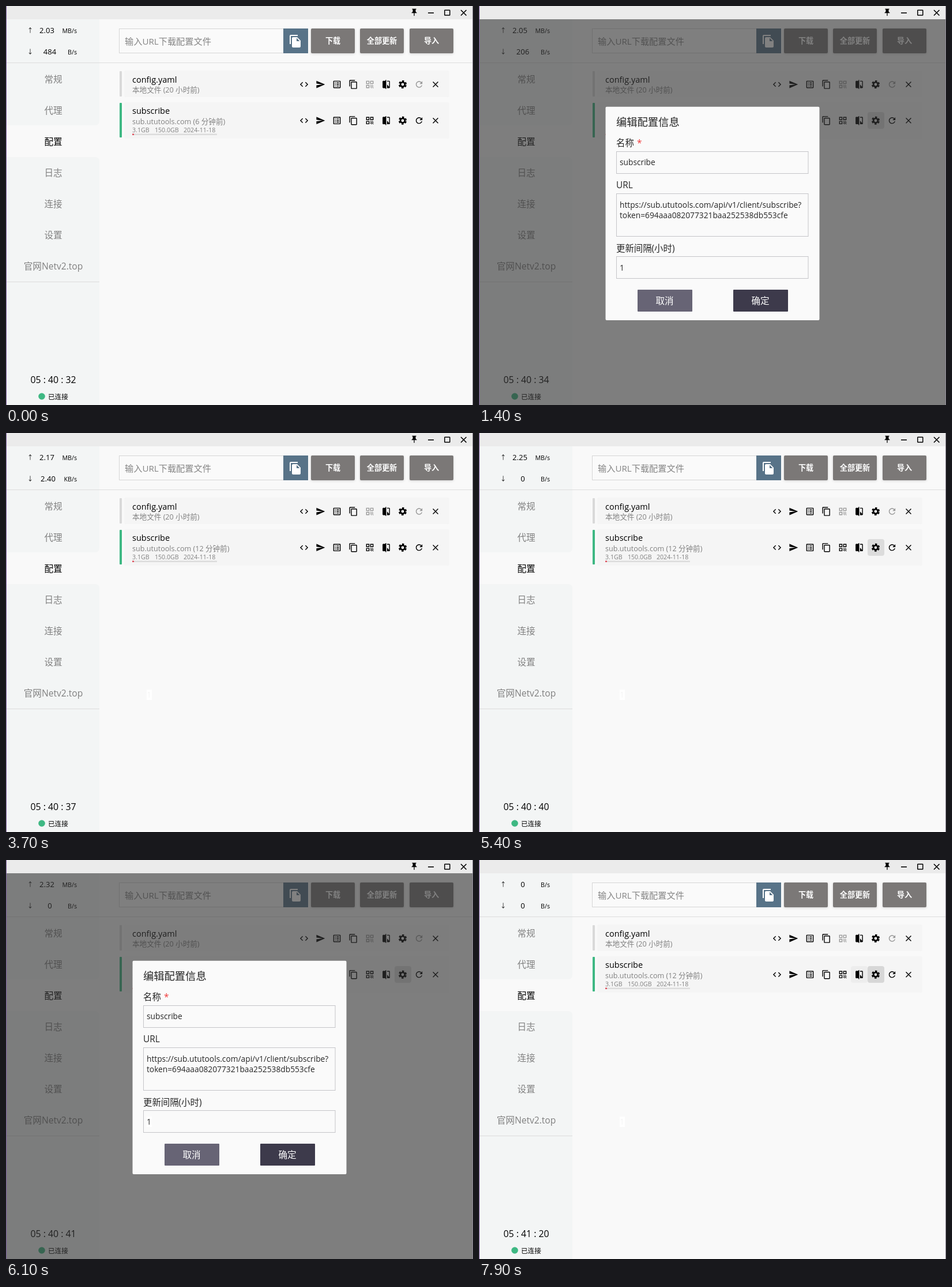
An HTML page that plays this animation: 810 px wide and 692 px high, repeating every 8 s.

```html
<!DOCTYPE html>
<html lang="zh-CN">
<head>
<meta charset="utf-8">
<title>配置</title>
<style>
  html, body { margin: 0; width: 100%; height: 100%; overflow: hidden; background: #f9f9f9; }
  svg { display: block; width: 810px; height: 692px; }
  text { font-family: "Open Sans", "Noto Sans CJK SC", "Noto Sans CJK", sans-serif; white-space: pre; }
  .mid { text-anchor: middle; }
  .end { text-anchor: end; }
  .menu { font-size: 15.6px; fill: #808080; }
  .arrow { font-size: 10.5px; }
  .num { font-size: 13px; }
  .unit { font-size: 10.7px; }
  .name { font-size: 14.5px; }
  .info { font-size: 12.6px; fill: #808080; }
  .usage { font-size: 10.6px; fill: #808080; }
  .btn { font-size: 13.1px; font-weight: 600; fill: #fff; }
  .label { font-size: 15.4px; fill: #262626; }
  .value { font-size: 13.75px; fill: #262626; }
  .action { font-size: 15.6px; font-weight: 500; fill: #fff; }
  .field { fill: #fafafa; stroke: #c4c4c8; }
  .tool { fill: #7b7877; filter: drop-shadow(0 1px 2px rgba(0, 0, 0, .15)); }
  .hover { fill: #000; opacity: 0; }
</style>
</head>
<body>
<svg viewBox="0 0 810 692" xmlns="http://www.w3.org/2000/svg">
  <defs>
    <symbol id="code" viewBox="0 0 24 24"><path d="M9.4 16.6L4.8 12l4.6-4.6L8 6l-6 6 6 6zm5.2 0l4.6-4.6-4.6-4.6L16 6l6 6-6 6z"/></symbol>
    <symbol id="send" viewBox="0 0 24 24"><path d="M2 21L23 12 2 3v7l15 2-15 2z"/></symbol>
    <symbol id="list" viewBox="0 0 24 24"><rect x="4" y="4" width="16" height="16" rx=".6" fill="none" stroke="currentColor" stroke-width="2"/><path d="M11 7h6v2h-6zm0 4h6v2h-6zm0 4h6v2h-6zM7 7h2v2H7zm0 4h2v2H7zm0 4h2v2H7z"/></symbol>
    <symbol id="copy" viewBox="0 0 24 24"><path d="M16 1H4c-1.1 0-2 .9-2 2v14h2V3h12zm3 4H8c-1.1 0-2 .9-2 2v14c0 1.1.9 2 2 2h11c1.1 0 2-.9 2-2V7c0-1.1-.9-2-2-2zm0 16H8V7h11z"/></symbol>
    <symbol id="grid" viewBox="0 0 24 24"><path d="M4 4h6v6H4zM4 14h6v6H4zM14 4h6v6h-6z" fill="none" stroke="currentColor" stroke-width="2"/><path d="M19 19h2v2h-2zM13 13h2v2h-2zM15 15h2v2h-2zM13 17h2v2h-2zM15 19h2v2h-2zM17 17h2v2h-2zM17 13h2v2h-2zM19 15h2v2h-2z"/></symbol>
    <symbol id="compare" viewBox="0 0 24 24"><path d="M10 3H5c-1.1 0-2 .9-2 2v14c0 1.1.9 2 2 2h5v2h2V1h-2zm9 0h-5v2h5v13l-5-6v9h5c1.1 0 2-.9 2-2V5c0-1.1-.9-2-2-2z"/></symbol>
    <symbol id="gear" viewBox="0 0 24 24"><g fill="none" stroke="currentColor"><circle cx="12" cy="12" r="5.4" stroke-width="3.8"/><circle cx="12" cy="12" r="8.2" stroke-width="3.6" stroke-dasharray="4.8 3.787" transform="rotate(13.2 12 12)"/></g></symbol>
    <symbol id="refresh" viewBox="0 0 24 24"><path d="M17.65 6.35C16.2 4.9 14.21 4 12 4c-4.42 0-8 3.58-8 8s3.58 8 8 8c3.73 0 6.84-2.55 7.73-6h-2.08c-.82 2.33-3.04 4-5.65 4-3.31 0-6-2.69-6-6s2.69-6 6-6c1.66 0 3.14.69 4.22 1.78L13 11h7V4z"/></symbol>
    <symbol id="close" viewBox="0 0 24 24"><path d="M5.7 5.7l12.6 12.6M18.3 5.7L5.7 18.3" stroke="currentColor" stroke-width="2"/></symbol>
    <symbol id="pin" viewBox="0 0 24 24"><path d="M16 9V4h1c1.3 0 1.3-2 0-2H7c-1.3 0-1.3 2 0 2h1v5c0 1.66-1.34 3-3 3v2h6v7l1 1 1-1v-7h6v-2c-1.66 0-3-1.34-3-3z"/></symbol>
    <symbol id="files" viewBox="0 0 24 24"><path d="M16 1H4c-1.1 0-2 .9-2 2v14h2V3h12zm-1 4l6 6v10c0 1.1-.9 2-2 2H8c-1.1 0-2-.9-2-2V7c0-1.1.9-2 2-2zm-1 7h5.5L14 6.5z"/></symbol>
  </defs>

  <rect width="810" height="692" fill="#f9f9f9"/>

  <!-- Sidebar -->
  <path d="M1 23H162V199q0 8-8 8H1zM1 262H154q8 0 8 8V692H1z" fill="#f3f5f5"/>
  <path d="M1 98.5H809M1 478.5H162" stroke="#dcdcdc"/>
  <g id="menu"></g>
  <text class="arrow mid" x="42" y="46">↑</text>
  <text class="num mid" id="upNum" y="46.5"></text>
  <text class="unit end" id="upUnit" x="123" y="46.5"></text>
  <text class="arrow mid" x="42" y="83">↓</text>
  <text class="num mid" id="downNum" y="83.5"></text>
  <text class="unit end" id="downUnit" x="123" y="83.5"></text>
  <text class="mid" id="clock" x="82" y="654" font-size="15.8"></text>
  <circle cx="62" cy="677" r="5.8" fill="#3eb883"/>
  <text x="73" y="681.5" font-size="11.6">已连接</text>

  <!-- Toolbar -->
  <rect x="196.5" y="39.5" width="285" height="42" fill="#fafafa" stroke="#d6d6d6"/>
  <text x="206" y="66.5" font-size="15.2" fill="#858585">输入URL下载配置文件</text>
  <rect x="481" y="39" width="43" height="43" fill="#587388"/>
  <use href="#files" x="490" y="49" width="24" height="24" fill="#fff"/>
  <g id="tools"></g>

  <!-- Profiles -->
  <rect x="205" y="112" width="564" height="46" rx="3" fill="#f5f5f5"/>
  <rect x="197" y="113" width="4" height="44" rx="1" fill="#d9d9d9"/>
  <text class="name" x="219" y="133">config.yaml</text>
  <text class="info" x="219" y="150">本地文件 (20 小时前)</text>
  <rect x="205" y="167" width="564" height="63" rx="3" fill="#f5f5f5"/>
  <rect x="197" y="168" width="4" height="60" rx="1" fill="#3eb883"/>
  <text class="name" x="219" y="187">subscribe</text>
  <text class="info" id="age" x="219" y="204.5"></text>
  <text class="usage" x="219" y="218.5">3.1GB</text>
  <text class="usage" x="258" y="218.5">150.0GB</text>
  <text class="usage" x="308" y="218.5">2024-11-18</text>
  <rect x="219" y="221.5" width="147" height="2.5" fill="#dcdcdc"/>
  <rect x="219" y="221.5" width="3" height="2.5" fill="#e05561"/>
  <rect class="hover" id="hoverCompare" x="645" y="184" width="29" height="29" rx="4"/>
  <rect class="hover" id="hoverGear" x="674" y="184" width="29" height="29" rx="4"/>
  <rect class="hover" id="hoverRefresh" x="703" y="184" width="28" height="29" rx="4"/>
  <g id="icons"></g>

  <!-- Title bar -->
  <rect width="810" height="23" fill="#ebebeb"/>
  <use href="#pin" x="700.5" y="3.5" width="15" height="15"/>
  <path d="M732 12H742" stroke="#000" stroke-width="1.6"/>
  <rect x="760.8" y="7.3" width="9" height="8.6" rx=".5" fill="none" stroke="#000" stroke-width="1.5"/>
  <path d="M789 7l9.5 9.5M798.5 7L789 16.5" stroke="#000" stroke-width="1.6"/>

  <!-- Dialog -->
  <g id="dialog">
    <rect x="1" y="23" width="808" height="669" fill="#333" opacity=".616"/>
    <rect x="219.5" y="174.7" width="371" height="370.3" rx="2" fill="#fafafa"/>
    <text x="238" y="208" font-size="18.3" fill="#262626">编辑配置信息</text>
    <text class="label" x="238" y="243">名称</text>
    <text class="label" x="274" y="243" style="fill:#f03a3a">*</text>
    <rect class="field" x="238.5" y="252.5" width="332.5" height="38"/>
    <text class="value" x="244" y="276">subscribe</text>
    <text class="label" x="238" y="316">URL</text>
    <rect class="field" x="238.5" y="325.5" width="332.5" height="74"/>
    <text class="value" x="244" y="350">https://sub.ututools.com/api/v1/client/subscribe?</text>
    <text class="value" x="244" y="368">token=694aaa082077321baa252538db553cfe</text>
    <text class="label" x="238" y="426">更新间隔(小时)</text>
    <rect class="field" x="238.5" y="434.5" width="332.5" height="38"/>
    <rect x="275" y="492" width="95" height="38" rx="1" fill="#676475"/>
    <text class="action mid" x="322" y="517">取消</text>
    <rect x="441" y="492" width="95" height="38" rx="1" fill="#3d3a4b"/>
    <text class="action mid" x="488" y="517">确定</text>
  </g>
  <rect id="mark" x="244" y="445" width="9" height="18"/>
  <text class="value" id="interval" x="244" y="459">1</text>

  <path d="M.5 0V692" stroke="#7b5c9c"/>
  <path d="M809.5 0V692" stroke="#8d8794"/>
</svg>
<script>
const $ = id => document.getElementById(id);
const LOOP = 8000;

$('menu').innerHTML = ['常规', '代理', '配置', '日志', '连接', '设置', '官网Netv2.top']
  .map((label, i) => `<text class="menu mid" x="82" y="${132.5 + i * 54.15}"${i === 2 ? ' style="fill:#000"' : ''}>${label}</text>`)
  .join('');

$('tools').innerHTML = [['下载', 529], ['全部更新', 614], ['导入', 700]]
  .map(([label, x]) => `<rect class="tool" x="${x}" y="39" width="76" height="43" rx="2"/>
    <text class="btn mid" x="${x + 38}" y="65">${label}</text>`)
  .join('');

const icons = ['code', 'send', 'list', 'copy', 'grid', 'compare', 'gear', 'refresh', 'close'];
const iconRow = (y, disabled) => icons.map((name, i) => {
  const color = disabled.includes(name) ? '#999' : '#000';
  return `<use href="#${name}" x="${508.5 + i * 28.5}" y="${y - 8.5}" width="17" height="17" fill="${color}" color="${color}"/>`;
}).join('');
$('icons').innerHTML = iconRow(136, ['grid', 'refresh']) + iconRow(198.7, []);

// Each step changes only the listed properties from its time on.
const steps = [
  [0, { up: '2.03 MB/s', down: '484 B/s', clock: '05:40:32', age: 6, dialog: 0, field: 'plain', compare: 0, gear: 0, refresh: 0 }],
  [400, { up: '1.99 MB/s', down: '412 B/s', clock: '05:40:33' }],
  [800, { refresh: .1 }],
  [1100, { up: '2.05 MB/s', down: '206 B/s', clock: '05:40:34', refresh: 0, gear: .1 }],
  [1300, { dialog: .6 }],
  [1400, { dialog: 1 }],
  [1900, { up: '2.13 MB/s', down: '274 B/s', clock: '05:40:35', gear: 0 }],
  [2300, { field: 'selected' }],
  [2400, { up: '2.11 MB/s', down: '548 B/s', clock: '05:40:36' }],
  [2800, { field: 'empty' }],
  [3200, { up: '2.17 MB/s', down: '2.40 KB/s', clock: '05:40:37', field: 'typed' }],
  [3700, { dialog: 0, age: 12 }],
  [3900, { up: '1.98 MB/s', down: '310 B/s', clock: '05:40:38' }],
  [4700, { up: '2.14 MB/s', down: '62 B/s', clock: '05:40:39' }],
  [5400, { up: '2.25 MB/s', down: '0 B/s', clock: '05:40:40', gear: .1 }],
  [5700, { dialog: 1 }],
  [6100, { up: '2.32 MB/s', clock: '05:40:41' }],
  [6400, { dialog: 0, gear: 0 }],
  [6800, { up: '1.96 MB/s', clock: '05:40:42' }],
  [7100, { up: '1.12 KB/s', clock: '05:41:19' }],
  [7600, { up: '0 B/s', clock: '05:41:20' }],
  [7700, { compare: .03 }],
  [7900, { gear: .12 }]
];

const numberX = { 'MB/s': 71, 'KB/s': 73, 'B/s': 76 };
function showRate(id, rate) {
  const [value, unit] = rate.split(' ');
  $(id + 'Num').textContent = value;
  $(id + 'Num').setAttribute('x', numberX[unit]);
  $(id + 'Unit').textContent = unit;
}

function showField({ field, dialog }) {
  const mark = { plain: 'none', selected: '#0078d7', empty: '#fff', typed: '#fff' }[field];
  const open = dialog > 0;
  const ink = field === 'selected' ? '#fff' : open ? '#262626' : '#f4f4f4';
  $('mark').style.fill = mark;
  $('interval').style.fill = ink;
  $('interval').style.opacity = field === 'empty' || (field === 'plain' && !open) ? 0 : open ? dialog : 1;
}

function show(s) {
  showRate('up', s.up);
  showRate('down', s.down);
  $('clock').textContent = s.clock.replaceAll(':', ' : ');
  $('age').textContent = `sub.ututools.com (${s.age} 分钟前)`;
  $('dialog').style.opacity = s.dialog;
  $('hoverCompare').style.opacity = s.compare;
  $('hoverGear').style.opacity = s.gear;
  $('hoverRefresh').style.opacity = s.refresh;
  showField(s);
}

let shown = -1;
function frame() {
  const t = performance.now() % LOOP;
  const passed = steps.filter(([at]) => at <= t);
  if (passed.length !== shown) {
    shown = passed.length;
    show(Object.assign({}, ...passed.map(([, change]) => change)));
  }
  requestAnimationFrame(frame);
}
frame();
</script>
</body>
</html>
```
